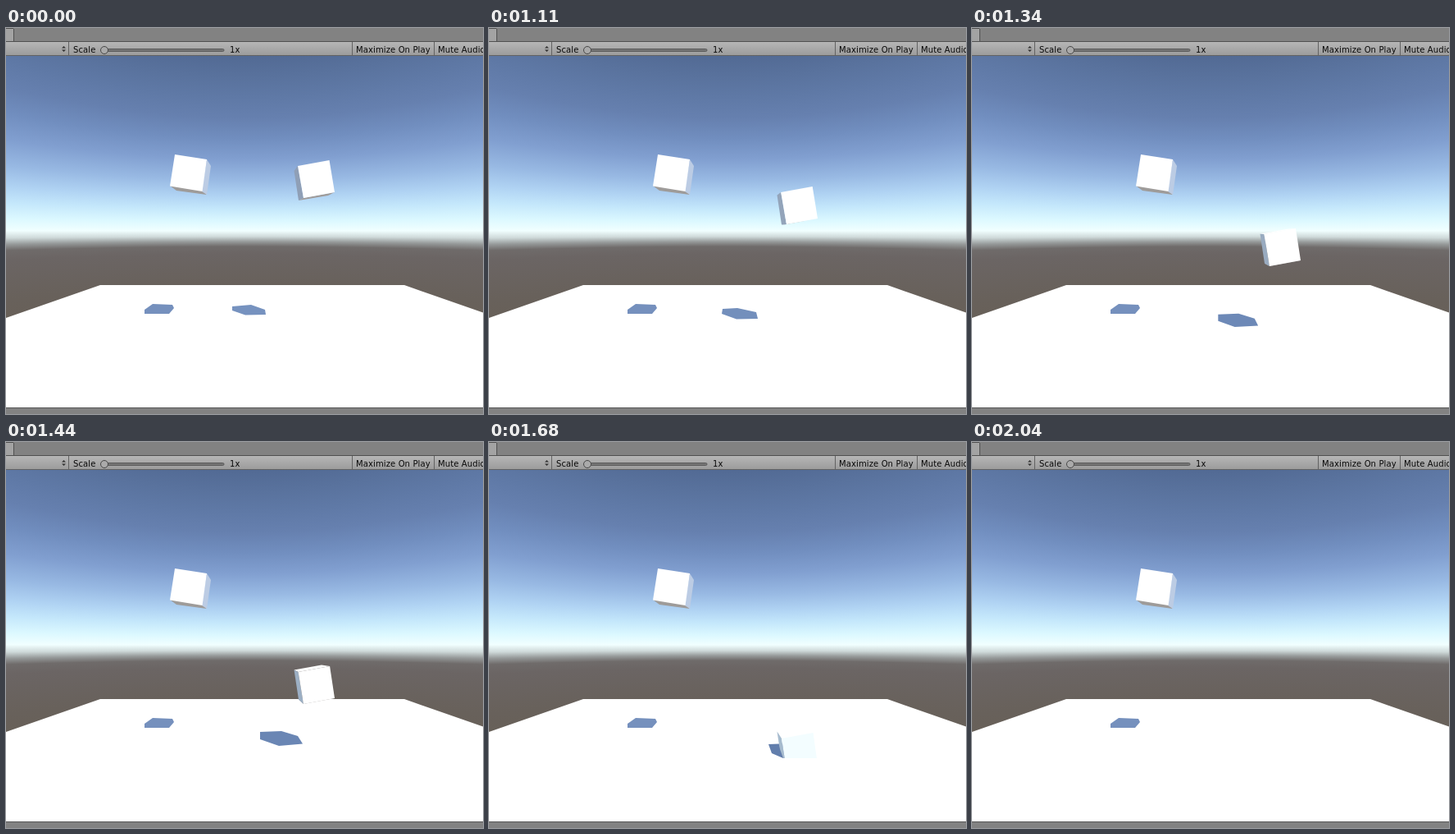
Animation, 582 px wide and 470 px high, one loop 2.29 s. Source, as an HTML page with a canvas:

```html
<!DOCTYPE html>
<html lang="en">
<head>
<meta charset="utf-8">
<title>Falling cube</title>
<style>
html, body { margin: 0; width: 100%; height: 100%; overflow: hidden; background: #828282; }
canvas, svg { position: absolute; left: 0; top: 0; display: block; }
text { font: 10px "DejaVu Sans", sans-serif; letter-spacing: .12px; fill: #080808; }
</style>
</head>
<body>
<canvas id="sky" width="582" height="470"></canvas>
<svg width="582" height="470" viewBox="0 0 582 470">
  <defs>
    <linearGradient id="bar" x1="0" y1="0" x2="0" y2="1">
      <stop offset="0" stop-color="#b6b6b6"/>
      <stop offset="1" stop-color="#9c9c9c"/>
    </linearGradient>
    <clipPath id="floor"><path d="M0 34H582V385H359L352 366H0Z"/></clipPath>
  </defs>

  <path fill="#fff" d="M115 313H486L582 346.5V462H0V353Z"/>
  <path fill="#7590bd" d="M169 343L179 336L203 337L205 341L199 348H169Z"/>
  <path fill="#9e9b99" d="M200 192L240 198L245 203L208 198Z"/>
  <path fill="#bccce4" d="M245 160L250 168L245 203L239 199Z"/>
  <path fill="#fff" d="M206 154L245 160L239.500 199L200 192.500Z"/>

  <polygon id="shadow"/>
  <g id="cube" clip-path="url(#floor)">
    <polygon id="under" fill="#a09c9a"/>
    <polygon id="lid" fill="#fff"/>
    <polygon id="side"/>
    <polygon id="front"/>
  </g>

  <g shape-rendering="crispEdges">
    <rect width="582" height="16" fill="#828282"/>
    <rect width="9" height="16" y="1" fill="#a3a3a3"/>
    <path d="M0 .5H9M9.500 1V16M0 16.500H582" stroke="#505050"/>
    <rect y="17" width="582" height="16" fill="url(#bar)"/>
    <path d="M76.500 17V33M422.500 17V33M522.500 17V33M0 33.500H582" stroke="#626262"/>
    <rect y="462" width="582" height="8" fill="#828282"/>
    <path d="M0 462.500H582" stroke="#565656"/>
  </g>
  <path fill="#333" d="M68 24.500L70.500 22L73 24.500ZM68 26.500H73L70.500 29Z"/>
  <rect x="118" y="25.500" width="148" height="3" rx="1.500" fill="#747474" stroke="#5c5c5c"/>
  <circle cx="120" cy="27" r="4.500" fill="#aaa" stroke="#484848"/>
  <text x="82" y="30">Scale</text>
  <text x="273" y="30">1x</text>
  <text x="427" y="30">Maximize On Play</text>
  <text x="527" y="30">Mute Audio</text>
</svg>
<script>
const LOOP = 2290;
const HORIZON = 248, FOCAL = 371, CENTER = 291;
const $ = id => document.getElementById(id);

// Sky colours by height on the centre column
const SKY = [
  [34, "#526a94"], [60, "#59729d"], [85, "#5f79a6"], [110, "#6680af"],
  [135, "#718ebf"], [160, "#819fd0"], [185, "#98b9e3"], [205, "#b0d3f3"],
  [220, "#c4e7fb"], [235, "#dbf8ff"], [247, "#f1ffff"], [254, "#cfdada"],
  [260, "#979b9b"], [266, "#6f6b6a"], [275, "#6b6564"], [313, "#68615b"],
  [350, "#675f56"]
];

function paintSky() {
  const ctx = $("sky").getContext("2d");
  const top = SKY[0][0], end = SKY[SKY.length - 1][0];
  for (let x = 0; x < 582; x++) {
    // Equal elevation bends away from the horizon towards the sides
    const k = Math.hypot(FOCAL, x - CENTER) / FOCAL;
    const bend = y => HORIZON + (y - HORIZON) * k;
    const g = ctx.createLinearGradient(0, bend(top), 0, bend(end));
    for (const [y, c] of SKY) g.addColorStop((y - top) / (end - top), c);
    ctx.fillStyle = g;
    ctx.fillRect(x, 34, 1, 428);
  }
}

// [start time, pixels fallen]
const STEPS = [[0, 0], [990, .5], [1110, 32], [1230, 58], [1340, 83],
  [1440, 112], [1560, 151], [1680, 193], [1810, null]];

// Shadow outlines by pixels fallen
const SHADOWS = [
  [0, [276,339, 299,337, 316,343, 317,349, 292,349.5, 276,344]],
  [32, [285,342, 303,341, 326,346, 328,354, 302,354.5, 284,348]],
  [58, [292,345, 316,344, 335,350, 338,358, 310,359, 292,352]],
  [112, [310,353, 336,352, 356,358, 362,367.5, 333,370, 310,362]],
  [193, [341,368, 368,367, 395,375, 398,384, 359,385, 345,379]]
];

const mix = (a, b, p) => a.map((v, i) => v + (b[i] - v) * p);
const rgb = c => `rgb(${c.map(Math.round)})`;

function shadowAt(fall) {
  let i = 0;
  while (i < SHADOWS.length - 2 && fall > SHADOWS[i + 1][0]) i++;
  const [a, from] = SHADOWS[i], [b, to] = SHADOWS[i + 1];
  return mix(from, to, (fall - a) / (b - a));
}

function shape(id, points, fill) {
  $(id).setAttribute("points", points.join(" "));
  if (fill) $(id).setAttribute("fill", rgb(fill));
}

function draw(t) {
  const fall = STEPS.filter(s => s[0] <= t).pop()[1];
  const shown = fall === null ? "none" : "inline";
  $("cube").style.display = $("shadow").style.display = shown;
  if (fall === null) return;

  const p = fall / 193, tilt = fall * .075;
  const tl = [356 + p, 168 + fall], tr = [394.5 + p, 161 + fall];
  const br = [401, 200 + fall], bl = [363, 207 + fall];
  const backTl = [351.5, 174 + fall - tilt], backBl = [357, 210 + fall - tilt];
  const backTr = [385, 168 + fall - tilt], backBr = [393, 204 + fall - tilt];

  shape("shadow", shadowAt(fall), mix([118, 146, 191], [98, 126, 172], p));
  shape("under", [bl, br, backBr, backBl]);
  shape("lid", fall > 80 ? [backTl, backTr, tr, tl] : []);
  shape("side", [backTl, tl, bl, backBl], mix([143, 159, 182], [166, 187, 206], p));
  shape("front", [tl, tr, br, bl],
    mix([255, 255, 255], [243, 253, 255], Math.max(0, (fall - 112) / 81)));
}

function tick() {
  draw(performance.now() % LOOP);
  requestAnimationFrame(tick);
}

paintSky();
tick();
</script>
</body>
</html>
```
